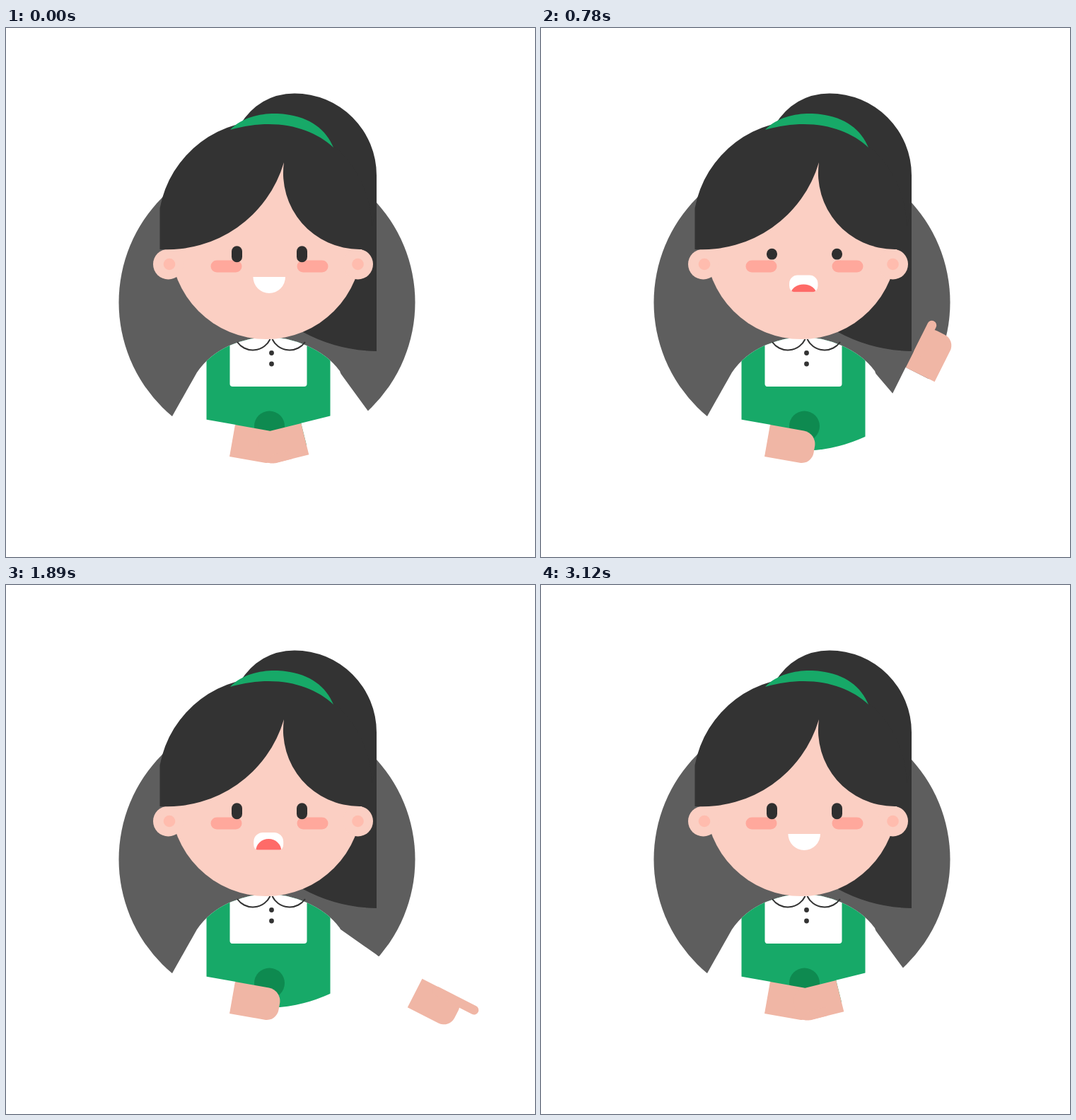
Write an HTML page that moves like this. It is 748 px wide and 748 px high and loops after 3660 ms.

```html
<!DOCTYPE html>
<html lang="en">
<head>
<meta charset="utf-8">
<title>Girl pointing</title>
<style>
  html, body { margin: 0; width: 100%; height: 100%; overflow: hidden; background: #fff; }
  svg { display: block; width: 100vw; height: 100vh; }
</style>
</head>
<body>
<svg viewBox="0 0 748 748">
  <defs>
    <clipPath id="disc"><circle cx="369" cy="388" r="209.8"/></clipPath>
    <clipPath id="torso"><use href="#body"/></clipPath>
    <clipPath id="lips"><path id="lipShape"/></clipPath>
  </defs>
  <circle cx="369" cy="388" r="209.5" fill="#5e5e5e"/>

  <!-- back hair -->
  <path fill="#333" d="M330 138Q358 93 408 92.5A116 116 0 0 1 524 208.5V457Q468 456 420 430L380 300Z"/>

  <!-- body and apron -->
  <path id="body" fill="#fff" d="M235 549L270 487Q287 462 316 449Q345 437 371 437Q397 437 425 449Q455 462 472 485L500 565V625H235Z"/>
  <path id="upperArm" fill="none" stroke="#fff" stroke-width="48" stroke-linecap="round"/>
  <g clip-path="url(#disc)">
    <g clip-path="url(#torso)">
      <rect x="283.5" y="430" width="175" height="180" fill="#17a968"/>
      <rect x="316.5" y="425" width="109" height="82" rx="4" fill="#fff"/>
    </g>
  </g>
  <circle cx="372.5" cy="563" r="21.5" fill="#0e8a50"/>
  <g fill="none" stroke="#333" stroke-width="2">
    <path d="M327 444A27 27 0 0 0 373.5 440"/>
    <path d="M423 444A27 27 0 0 1 376.5 440"/>
  </g>
  <g fill="#333">
    <circle cx="375.5" cy="459.5" r="3.4"/>
    <circle cx="375.5" cy="475" r="3.4"/>
  </g>

  <!-- head -->
  <g fill="#fbcfc3">
    <circle cx="368" cy="304.5" r="135.5"/>
    <circle cx="229.5" cy="334" r="21.5"/>
    <circle cx="497.5" cy="334" r="21.5"/>
  </g>
  <g fill="#ffbcae">
    <circle cx="231" cy="334" r="8.3"/>
    <circle cx="497.5" cy="334" r="8.3"/>
  </g>
  <path fill="#333" d="M217.5 313V255A151 151 0 0 1 517 285L524 250V313H500A108 108 0 0 1 393 190A172 172 0 0 1 217.5 313Z"/>
  <path fill="#17a968" d="M317 144C338 122 372 119 395 122C430 126 453 144 463 169C432 140 380 126 317 144Z"/>
  <g fill="#ffa89c">
    <rect x="289.5" y="328.5" width="44" height="17" rx="8.5"/>
    <rect x="411.5" y="328.5" width="44" height="17" rx="8.5"/>
  </g>
  <g fill="#2f2f2f">
    <rect class="eye" x="319" width="15" rx="7.5"/>
    <rect class="eye" x="411" width="15" rx="7.5"/>
  </g>
  <path id="mouth" fill="#fff"/>
  <g clip-path="url(#lips)"><ellipse id="tongue" cx="371.3" cy="376" rx="18" fill="#fe6b68"/></g>

  <!-- arms -->
  <g transform="translate(320 583.5) rotate(10)">
    <path fill="#fff" d="M1-23H-80a12 12 0 0 0-12 12V11a12 12 0 0 0 12 12H1Z"/>
    <path fill="#f0b6a5" d="M0-22.8H48.5a19 19 0 0 1 19 19V5.8a17 17 0 0 1-17 17H0Z"/>
  </g>
  <g id="foreArm">
    <path fill="#fff" d="M77-23H0a23 23 0 0 0 0 46H77Z"/>
    <g transform="translate(77 0)" fill="#f0b6a5">
      <path d="M0-22.8H49a17 17 0 0 1 17 17V5.8a17 17 0 0 1-17 17H0Z"/>
      <rect id="finger" x="20" y="-23" height="13" rx="6.5"/>
    </g>
  </g>
</svg>
<script>
const LOOP = 3660, STEP = 30;
const $ = id => document.getElementById(id);
const eyes = document.querySelectorAll('.eye');

const clamp = v => Math.max(0, Math.min(1, v));
const mix = (a, b, u) => a + (b - a) * u;
const ramp = (t, from, to) => clamp((t - from) / (to - from));
// a sets how slowly the move starts, b how softly it ends
const ease = (u, a, b) => 1 - (1 - u ** a) ** b;

const SMILE = { cx: 372.2, w: 22.8, top: 352, h: 23, r: 0, bx: 22.8, by: 23, tongue: 0 };
const SMALL = { cx: 371.5, w: 17, top: 348, h: 20, r: 7, bx: 13, by: 13, tongue: 0 };
const OPEN = { cx: 371.2, w: 21, top: 350, h: 24.5, r: 13, bx: 5, by: 8, tongue: 17 };

function blend(a, b, u) {
  const out = {};
  for (const key in a) out[key] = mix(a[key], b[key], u);
  return out;
}

function drawArm(t) {
  const reach = ease(ramp(t, 510, 1200), 1.58, 3.47) - ease(ramp(t, 2550, 3000), 1.84, 1.5);
  const arc = Math.sin(Math.PI * reach);
  const sway = t < 2000 ? -3 : 3;
  const x = mix(497.5, 509.5, reach) + sway * arc;
  const y = mix(562.5, 542, reach) + 9 * arc;
  $('upperArm').setAttribute('d', `M454 503L${x} ${y}`);
  $('foreArm').setAttribute('transform', `translate(${x} ${y}) rotate(${mix(-194, 27, reach)})`);
  $('finger').setAttribute('width', mix(34, 72, reach));
}

function drawEyes(t) {
  const blink = mid => clamp(1.1 - Math.abs(t - mid) / 150);
  const h = mix(23, 5, Math.max(blink(675), blink(2835)));
  for (const eye of eyes) {
    eye.setAttribute('y', 319.7 - h / 2);
    eye.setAttribute('height', h);
    eye.setAttribute('ry', Math.min(7.5, h / 2));
  }
}

function mouthPath({ cx, w, top, h, r, bx, by }) {
  return `M${cx - w + r} ${top}H${cx + w - r}a${r} ${r} 0 0 1 ${r} ${r}` +
    `V${top + h - by}a${bx} ${by} 0 0 1 ${-bx} ${by}H${cx - w + bx}` +
    `a${bx} ${by} 0 0 1 ${-bx} ${-by}V${top + r}a${r} ${r} 0 0 1 ${r} ${-r}Z`;
}

function drawMouth(t) {
  const opened = blend(blend(SMILE, SMALL, ramp(t, 510, 660)), OPEN, ramp(t, 660, 810));
  // the smile returns in three held steps
  const closing = clamp(Math.floor((t - 1920) / 120) / 3);
  const mouth = blend(opened, SMILE, closing);
  const d = mouthPath(mouth);
  $('mouth').setAttribute('d', d);
  $('lipShape').setAttribute('d', d);
  $('tongue').setAttribute('ry', mouth.tongue);
}

function draw(time) {
  const t = Math.floor((time % LOOP) / STEP) * STEP;
  drawArm(t);
  drawEyes(t);
  drawMouth(t);
}

const start = performance.now();
function tick() {
  draw(performance.now() - start);
  requestAnimationFrame(tick);
}
tick();
</script>
</body>
</html>
```
